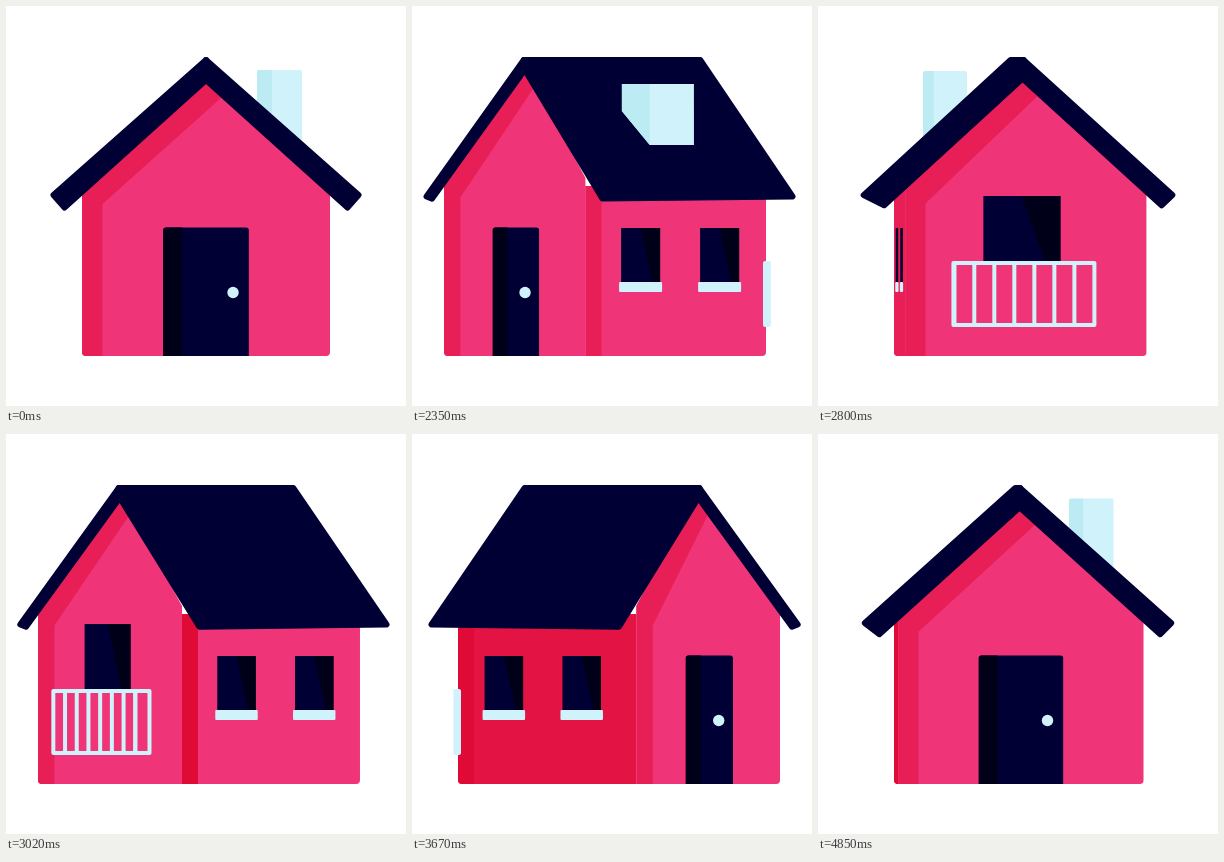
Animation, 400 px wide and 400 px high, one loop 4870 ms. Source, as an HTML page:

```html
<!DOCTYPE html>
<html lang="en">
<head>
<meta charset="utf-8">
<title>Turning house</title>
<style>
  html, body { margin: 0; width: 100%; height: 100%; overflow: hidden; background: #fff; }
  svg { display: block; width: 100vw; height: 100vh; }
</style>
</head>
<body>
<svg id="stage" viewBox="0 0 400 400"></svg>
<script>
const LOOP = 4870;
const PINK = [240, 52, 120], ROSE = [232, 30, 86], RED = [224, 10, 54];
const NAVY = '#000034', DARK = '#000018', LIGHT = '#d0f3fb', SHADE = '#bdebf4';
const stage = document.getElementById('stage');

const clamp = v => Math.max(0, Math.min(1, v));
const rgb = c => `rgb(${c.map(Math.round)})`;
const mix = (a, b, t) => a.map((v, i) => v + (b[i] - v) * t);

// Monotone cubic curve through a few points.
function curve(xs, ys) {
  const n = xs.length - 1;
  const slope = i => (ys[i + 1] - ys[i]) / (xs[i + 1] - xs[i]);
  const tangent = i => {
    if (i === 0) return slope(0);
    if (i === n) return slope(n - 1);
    const a = slope(i - 1), b = slope(i);
    if (a * b <= 0) return 0;
    const h = xs[i] - xs[i - 1], k = xs[i + 1] - xs[i];
    return 3 * (h + k) / ((2 * k + h) / a + (k + 2 * h) / b);
  };
  return x => {
    if (x <= xs[0]) return ys[0];
    if (x >= xs[n]) return ys[n];
    let i = 0;
    while (x > xs[i + 1]) i++;
    const h = xs[i + 1] - xs[i], t = (x - xs[i]) / h, q = 1 - t;
    return ys[i] * (1 + 2 * t) * q * q + ys[i + 1] * t * t * (3 - 2 * t)
      + h * t * q * (tangent(i) * q - tangent(i + 1) * t);
  };
}

// Quarter turns made at a given time.
const turnAt = curve([1900, 2000, 2350, 2800, 3270, 4120, 4850, LOOP],
                     [0, 0, 0.51, 1.97, 2.965, 3.845, 3.99, 3.992]);

// Horizontal positions while a gable turns away to the left.
const QUARTER = [0, 0.03, 0.155, 0.35, 0.51, 0.965, 1];
const house = {
  wallL:  curve(QUARTER, [76, 71, 58, 31, 32, 52, 54]),
  corner: curve(QUARTER, [324, 312, 281, 225, 174, 62, 54]),
  wallR:  curve(QUARTER, [324, 324, 334, 350, 354, 348, 346]),
  apex:   curve(QUARTER, [200, 195, 172, 138, 113, 75, 77]),
  ridgeN: curve(QUARTER, [200, 194, 169, 137, 112, 79, 78]),
  ridgeF: curve(QUARTER, [200, 208, 231, 264, 288, 323, 322]),
  eaveL:  curve(QUARTER, [45, 43, 31, 8, 12, 24, 24]),
  eaveC:  curve(QUARTER, [341.5, 333, 300, 240, 189, 38, 24]),
  eaveR:  curve(QUARTER, [355, 357, 366, 379, 383, 377, 376])
};

const TURN = [0, 0.51, 1, 1.49, 1.97, 2.155, 2.6, 3.4, 3.845, 4];
const chimney = {
  left:  curve(TURN, [251, 210, 162, 118, 105, 111, 150, 205, 250, 251]),
  right: curve(TURN, [296, 282, 238, 190, 149, 150, 190, 245, 289, 296]),
  edge:  curve(TURN, [266, 238, 180, 135, 116, 116, 155, 210, 254, 266]),
  top:   curve(TURN, [64, 78, 82, 78, 65, 70, 85, 85, 70, 64])
};
const FRONT = [0, 0.51, 1, 1.49, 2];
const cutWidth = curve(FRONT, [45, 28, 0, 28, 45]);
const cutTop = curve(FRONT, [95, 105, 142, 105, 95]);
const chimneyBase = curve(FRONT, [134, 139, 142, 139, 134]);

const poly = (points, fill, extra = '') =>
  `<polygon points="${points.map(p => p.map(v => v.toFixed(2))).join(' ')}" fill="${fill}" ${extra}/>`;
const rect = (x1, y1, x2, y2, fill, r = 0, extra = '') =>
  `<rect x="${Math.min(x1, x2)}" y="${y1}" width="${Math.abs(x2 - x1)}" height="${y2 - y1}" rx="${r}" fill="${fill}" ${extra}/>`;
const clip = (id, shape) => `<clipPath id="${id}">${shape}</clipPath>`;
const roofPoly = points =>
  poly(points, NAVY, `stroke="${NAVY}" stroke-width="6" stroke-linejoin="round"`);
const rail = `stroke="${LIGHT}" stroke-width="4" stroke-linejoin="round"`;

function pane(x1, y1, x2, y2) {
  const at = f => x1 + (x2 - x1) * f;
  return rect(x1, y1, x2, y2, NAVY)
    + poly([[at(0.5), y1], [x2, y1], [x2, y2], [at(0.8), y2]], DARK);
}

function drawChimney(p, inFront) {
  const l = chimney.left(p), r = chimney.right(p), top = chimney.top(p);
  let outline = rect(l, top, r, 140, LIGHT, 2);
  if (inFront) {
    const base = chimneyBase(p), w = cutWidth(p), cut = cutTop(p);
    outline = poly(p < 1
      ? [[l, top], [r, top], [r, base], [l + w, base], [l, cut]]
      : [[l, top], [r, top], [r, cut], [r - w, base], [l, base]], LIGHT);
  }
  return clip('stack', outline) + outline
    + `<g clip-path="url(#stack)">${rect(l, top, chimney.edge(p), 145, SHADE)}</g>`;
}

function drawSide(lo, hi, p, shade) {
  const width = hi - lo, turn = p % 2;
  const fill = mix(PINK, shade, clamp((turn - 1.1) / 0.5));
  let out = rect(lo, 180, hi, 350, rgb(fill))
    + rect(lo, 180, lo + Math.min(width, 16), 350, rgb(shade));
  if (width < 8) return out;
  const c = Math.cos(turn * Math.PI / 2);
  const gap = 0.25 - 0.045 * Math.abs(c), lip = 2 * Math.min(1, width / 50);
  for (const sign of [-1, 1]) {
    const mid = lo + width * (0.5 + 0.035 * c + sign * gap), half = width * 0.108;
    out += pane(mid - half, 222, mid + half, 277)
      + rect(mid - half - lip, 276, mid + half + lip, 286, LIGHT, 1);
  }
  return out;
}

function drawDoor(lo, width, k, s) {
  const l = lo + width * (0.327 + 0.022 * s), r = lo + width * 0.673;
  const strip = Math.min(r - l, 20 * k ** 0.4 - 1);
  return clip('doorway', rect(l, 221.5, r, 356, NAVY, 3))
    + `<g clip-path="url(#doorway)">${rect(l, 221, r, 350, NAVY)}${rect(l, 221, l + strip, 350, DARK)}</g>`
    + `<ellipse cx="${lo + width * (0.609 - 0.05 * s)}" cy="286.5" rx="${Math.min(5.7, (r - l) / 4)}" ry="5.7" fill="${LIGHT}"/>`;
}

function drawBalcony(lo, width, k, s, dir) {
  const mid = lo + width * 0.49, half = Math.max(0, 74 * k - 2);
  const front = mid + dir * 20 * s;
  let out = rect(mid - dir * half, 257, front - dir * half, 319, 'none', 0, rail)
    + rect(front - half, 257, front + half, 319, 'none', 0, rail);
  for (let i = 1; i < 7; i++) {
    const x = front - half + 2 * half * i / 7;
    out += `<path d="M${x} 257V319" ${rail}/>`;
  }
  return out;
}

function draw(time) {
  const p = turnAt(time);
  const incoming = Math.floor(p) % 2 === 1;
  const u = incoming ? 2 - p % 2 : p % 2;
  const s = Math.sin(u * Math.PI / 2);
  const flip = x => incoming ? 400 - x : x;
  const h = {};
  for (const name in house) h[name] = house[name](u);

  const back = p >= 1 && p < 3;
  const dir = incoming ? 1 : -1;
  const [lo, hi] = [flip(h.wallL), flip(h.corner)].sort((a, b) => a - b);
  const [sideLo, sideHi] = [flip(h.corner), flip(h.wallR)].sort((a, b) => a - b);
  const width = hi - lo, k = width / 248;
  const apex = flip(h.apex);
  const innerY = 74 - 13 * s ** 0.7;
  const outEave = 189 + 2 * s, inEave = 201.5 - 10.5 * Math.sqrt(s);

  const gable = [[lo, 350], [lo, 172], [apex, innerY - 8], [hi, 172], [hi, 350]];
  const strip = lo + Math.min(width, 20.5 * k ** 0.4);
  let walls = drawSide(sideLo, sideHi, p, p < 2 ? ROSE : RED)
    + clip('gable', poly(gable, NAVY)) + poly(gable, rgb(PINK))
    + `<g clip-path="url(#gable)">`
    + poly([[lo, 350], [strip, 350], [strip, 198 - 9 * s],
            [apex + 14 * k + 1, innerY + 18], [apex, innerY - 10], [lo, 160]], rgb(ROSE))
    + '</g>';
  walls += back
    ? pane(lo + width * 0.324, 190, lo + width * 0.643, 256)
    : drawDoor(lo, width, k, s);

  const at = (x, y) => [flip(x), y];
  const bandIn = h.eaveL + Math.max(5, 13.5 * (h.eaveC - h.eaveL) / 296.5);
  const roof = roofPoly([at(h.ridgeN, 54), at(h.ridgeF, 54), at(h.eaveR - 2.5, outEave),
                         at(h.eaveC + 3 * s, inEave), at(h.apex, innerY)])
    + roofPoly([at(h.ridgeN, 54), at(h.eaveL + 2.5, outEave),
                at(bandIn, inEave), at(h.apex, innerY)]);

  // The balcony shows past the far edge before its own wall does.
  let balcony = '';
  const peek = clamp((u - 0.4) / 0.6);
  if (back) balcony = drawBalcony(lo, width, k, s, dir);
  else if (peek > 0) {
    balcony = rect(flip(h.wallR - 1), 257, flip(h.wallR - 1 + 21 * peek), 319, 'none', 0, rail);
  }

  const inFront = p > 0.06 && p < 1.94;
  const stack = drawChimney(p, inFront);
  stage.innerHTML = (inFront ? '' : stack)
    + clip('outline', rect(Math.min(lo, sideLo), 40, Math.max(hi, sideHi), 350, NAVY, 4))
    + `<g clip-path="url(#outline)">${walls}</g>`
    + roof + (inFront ? stack : '') + balcony;
}

const start = performance.now();
function tick() {
  draw((performance.now() - start) % LOOP);
  requestAnimationFrame(tick);
}
tick();
</script>
</body>
</html>
```
